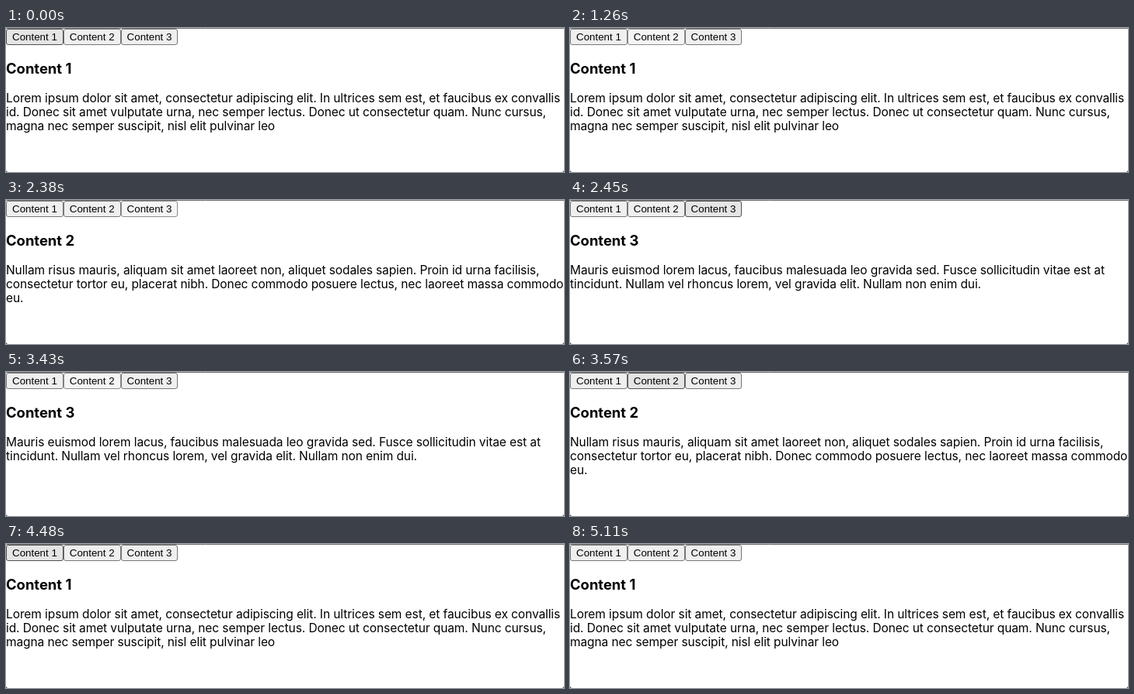
An HTML page for the animation above (5.88 s loop, 718x186 px).

```html
<!DOCTYPE html>
<html lang="en">
<head>
<meta charset="utf-8">
<title>Tabs</title>
<style>
  html, body { margin: 0; width: 100%; height: 100%; overflow: hidden; background: #fff; }
  svg { display: block; }
  text { white-space: pre; }
  .tab rect { fill: #efefef; stroke: #767676; }
  .tab.hover rect { fill: #e5e5e5; stroke: #4f4f4f; }
  .tab.press rect { fill: #f5f5f5; stroke: #8d8d8d; }
  .tab text { font: 13.333px "Liberation Sans", Arial, sans-serif; }
  .title { font: bold 18.4px Inter, sans-serif; }
  .line { font: 15.5px Inter, sans-serif; letter-spacing: -.09px; }
</style>
</head>
<body>
<svg id="stage" width="718" height="186">
  <path d="M0 .5H718" stroke="#707070"/>
  <path d="M0 184v2h2zM718 184v2h-2z" fill="#555"/>
</svg>
<script>
const LOOP = 5880;
const pages = [
  ["Lorem ipsum dolor sit amet, consectetur adipiscing elit. In ultrices sem est, et faucibus ex convallis",
   "id. Donec sit amet vulputate urna, nec semper lectus. Donec ut consectetur quam. Nunc cursus,",
   "magna nec semper suscipit, nisl elit pulvinar leo"],
  ["Nullam risus mauris, aliquam sit amet laoreet non, aliquet sodales sapien. Proin id urna facilisis,",
   "consectetur tortor eu, placerat nibh. Donec commodo posuere lectus, nec laoreet massa commodo",
   "eu."],
  ["Mauris euismod lorem lacus, faucibus malesuada leo gravida sed. Fusce sollicitudin vitae est at",
   "tincidunt. Nullam vel rhoncus lorem, vel gravida elit. Nullam non enim dui."]
];
// start time, visible page, tab under the pointer, tab state
const steps = [
  [0, 0, 0, "hover"], [490, 0, 1, "hover"], [1260, 0, 1, "press"],
  [1330, 1, 1, "hover"], [1890, 1, 2, "hover"], [2310, 1, 2, "press"],
  [2450, 2, 2, "hover"], [2940, 2, 1, "hover"], [3430, 2, 1, "press"],
  [3570, 1, 1, "hover"], [4130, 1, 0, "hover"], [4410, 1, 0, "press"],
  [4480, 0, 0, "hover"], [4970, 0, -1, ""]
];

const stage = document.getElementById("stage");

function add(parent, tag, attrs, text = "") {
  const el = document.createElementNS("http://www.w3.org/2000/svg", tag);
  for (const key in attrs) el.setAttribute(key, attrs[key]);
  el.textContent = text;
  return parent.appendChild(el);
}

const tabs = pages.map((_, i) => {
  const tab = add(stage, "g", { class: "tab" });
  const x = i * 73.8;
  add(tab, "rect", { x: Math.round(x) + .5, y: 1.5, width: i < 2 ? 73 : 72, height: 20, rx: 2.5 });
  add(tab, "text", { x: x + 8, y: 16 }, `Content ${i + 1}`);
  return tab;
});

const panels = pages.map((lines, i) => {
  const panel = add(stage, "g", {});
  add(panel, "text", { class: "title", x: 0, y: 59 }, `Content ${i + 1}`);
  lines.forEach((line, n) => add(panel, "text", { class: "line", x: 0, y: 96 + n * 18 }, line));
  return panel;
});

function draw(now) {
  const t = now % LOOP;
  const [, page, target, state] = steps.findLast(step => step[0] <= t);
  tabs.forEach((tab, i) => tab.setAttribute("class", i === target ? `tab ${state}` : "tab"));
  panels.forEach((panel, i) => panel.setAttribute("display", i === page ? "inline" : "none"));
}

function tick() {
  draw(performance.now());
  requestAnimationFrame(tick);
}
tick();
</script>
</body>
</html>
```
